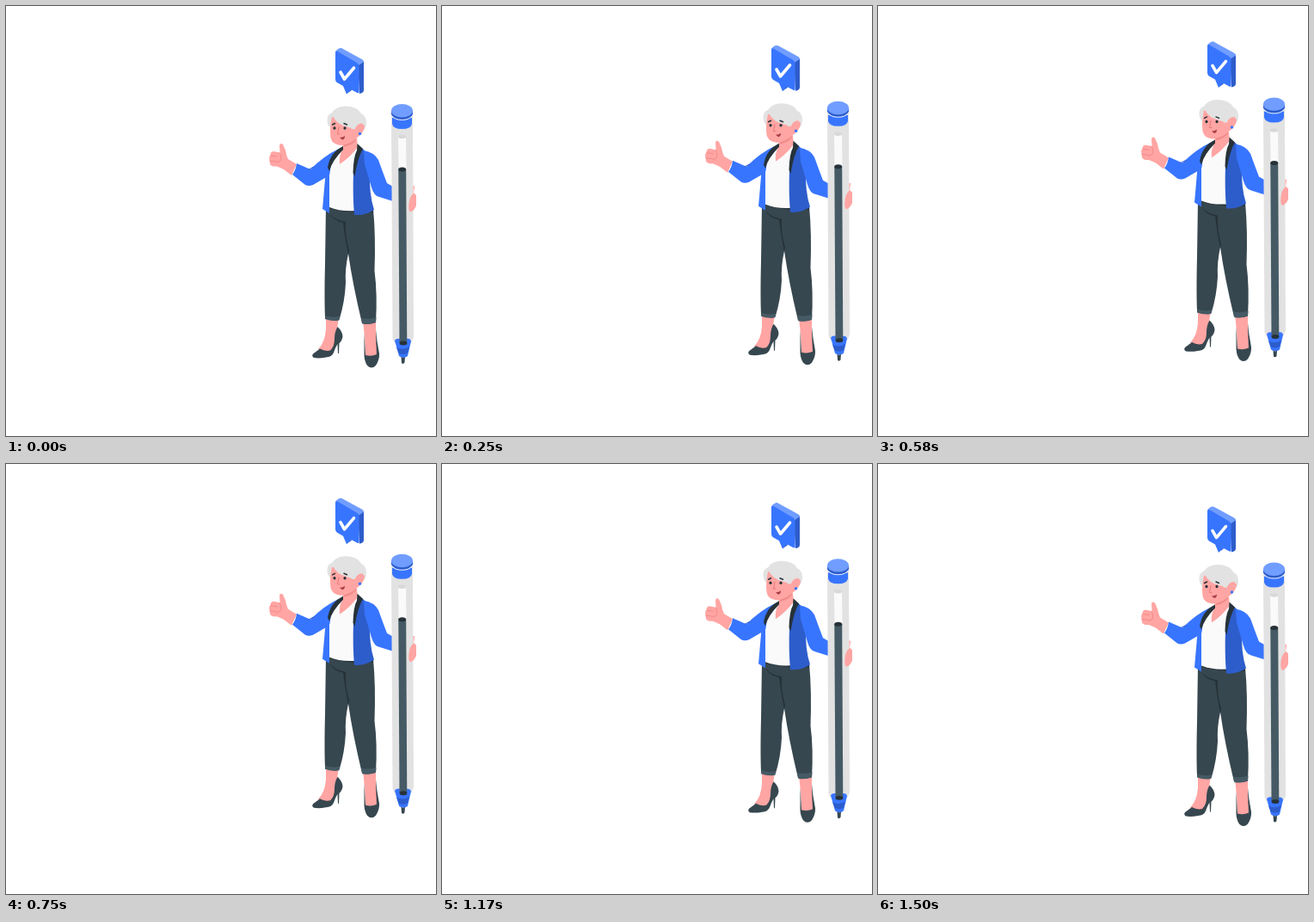
Animation, 500 px wide and 500 px high, one loop 1540 ms. Source, as an HTML page:

```html
<!DOCTYPE html>
<html lang="en">
<head>
<meta charset="utf-8">
<title>Thumbs up</title>
<style>
  html, body { margin: 0; width: 100%; height: 100%; overflow: hidden; background: #fff; }
  svg { display: block; width: 100%; height: 100%; }
  .blue { fill: #3875ff; }
  .deep { fill: #2d5dcb; }
  .pale { fill: #709dff; }
  .skin { fill: #ffa5a3; }
  .dark { fill: #37474f; }
  .ink { fill: #263238; }
  .slate { fill: #455a64; }
  .grey { fill: #e2e2e2; }
  .white { fill: #fafafa; }
  .line { fill: none; stroke-linecap: round; stroke-linejoin: round; }
</style>
</head>
<body>
<svg viewBox="0 0 500 500">
  <g id="scene">
    <g id="bubble">
      <path class="deep" d="M409 67L416 64V98Q416 100 414 101L411 102ZM396 102L402 98L400 95Z"/>
      <path class="pale" d="M383 53Q385 50 388 49Q390 48.500 392 50L414 62Q416 63 416 65L410 69Z"/>
      <path class="blue" d="M383 54Q383 51.500 386 53L408 66Q410.500 67.500 410.500 70V100Q410.500 102 408.500 101L401 97L396 102.500L392 93L385 89Q383 88 383 85Z"/>
      <path class="line" stroke="#fff" stroke-width="3.600" d="M389 77L393.500 85L404.500 72"/>
    </g>

    <g id="legs">
      <path class="skin" d="M372 362H387L385 375Q384 394 378 401Q370 404 363 399Q371 391 372 376Z"/>
      <path class="dark" d="M385.500 373Q391 378 391.500 384Q391 389 387.500 392L387 404H386L385.500 393Q383 397 381 403Q379 408 372 408.500Q364 410 358 409Q355 407 357 404.500L365 398.500Q371 402 377 400.500Q382 396 382 387Q382 379 385.500 373Z"/>
      <path class="skin" d="M415 366H430L430 380L432 407H418L417 385Z"/>
      <path class="dark" d="M430 376Q431 389 434 404Q434.500 411 430 418Q425 423 420 418Q416 412 416.500 402L416.500 380L418 406Q425 408 431 405Q430 390 430 376Z"/>
      <path class="dark" d="M372 233L371 300Q370 340 371 362Q378 367 387.500 365Q394 344 395 322Q394 306 398 288Q403 323 414 369Q423 371 430 368Q432 335 428.500 308Q430 268 427 236Z"/>
      <path class="ink" d="M375 233L405 238L427 236V240Q401 242 375 235Z"/>
      <path class="ink" d="M376 241Q381 250 392 252Q394 269 398 289L399 284Q394 266 395 251Q382 249 376 241Z"/>
      <path class="slate" d="M371 360Q379 363 388 361L387 365.500Q379 367 371 364ZM413 363Q422 365 430.500 362L430 368Q422 371 414.500 369.500Z"/>
    </g>

    <g id="torso">
      <path class="skin" d="M338 184L328 178Q326 174 325 168L322 161Q319 158.500 318 162L318.500 170.500L311 169Q307.500 169.500 307.500 173L306 176L307 184Q309 187 315 186.500L323 190L332 197Z"/>
      <path class="line" stroke="#ee8586" stroke-width=".8" d="M308 174L315 175M307 180L315 181M318 171Q321 174 319 180L315 182"/>
      <path class="blue" d="M387 166Q370 174 354 190L338 183Q337 191 333 196L348 208Q352 210 357 208L376 197Z"/>
      <path class="line" stroke="#2d5dcb" stroke-width="1" d="M352 190L358 187"/>
      <path class="white" d="M391 166L378 183Q374 210 376 234Q388 239 406 238L408 164Z"/>
      <path class="skin" d="M392 156L391 168Q387 174 388 184Q400 176 409 164L408 154Z"/>
      <path class="blue" d="M391 164Q377 172 372 190L368 236L376 241V190Q378 180 391 167Z"/>
      <path class="ink" d="M392 163Q377 170 374 188L376 192Q379 180 392 167Z"/>
      <path class="deep" d="M413 165Q423 170 423 190Q422 219 428 237Q418 244 405 243Q403 222 404 192Z"/>
      <path class="ink" d="M408.500 160L415 166Q409 176 405.500 198L403.500 194Q404 175 408 168Z"/>
      <path class="blue" d="M416 168Q428 170 433 179Q438 193 443 206L450 210V227L434 222Q428 221 425 211L417 184Z"/>
    </g>

    <g id="head">
      <path class="grey" d="M379 143Q374 140 373.500 134Q373 126 379 124Q384 116 396 116.500Q409 117 413 125Q419 128 419 136Q419 142 414 147Q411 153 406 152L390 145Z"/>
      <path class="skin" d="M379 129Q376 143 377.500 153Q379 161 389 162Q401 162 407 154Q416 148 417 140Q414 133 407 140L398 131Z"/>
      <path fill="#f08b8b" d="M393 161.500Q403 159 408 153Q406 161 392.500 164Z"/>
      <path class="grey" d="M379 128Q383 118 398 121Q411 124 412 135Q407 139 406 143Q402 144 400 141Q398 142 396 140Q385 138 380 128Z"/>
      <path class="line" stroke="#263238" stroke-width="1.500" d="M379.500 138L382.500 136.500M393 136.500L396.500 138"/>
      <ellipse class="ink" cx="382" cy="142" rx="1.600" ry="1.800"/>
      <ellipse class="ink" cx="394" cy="142" rx="1.600" ry="1.800"/>
      <path class="line" stroke="#e87978" stroke-width="1" d="M387 141L385.500 149H388"/>
      <path fill="#a83d48" d="M388 153Q392 153 394 151Q394 155 391 155.500Z"/>
      <circle class="blue" cx="411.500" cy="148.500" r="1.700"/>
    </g>

    <g id="pen">
      <path class="grey" d="M448 124H473L474 385Q473 390 469 394H455Q450 391 449.500 386Z"/>
      <path class="white" d="M456 152H465L465.500 190H456.500Z"/>
      <ellipse cx="460.500" cy="152" rx="4.500" ry="2.200" fill="#d8d8d8"/>
      <path class="blue" d="M452 389Q454 385 462 388Q470 385 471 390L467 407Q462 411 457 407Z"/>
      <path class="deep" d="M454 397Q462 401 469 396L466.500 404Q462 406 457 404Z"/>
      <path class="slate" d="M456.300 190H465.200L466.300 392H457.500Z"/>
      <ellipse class="ink" cx="460.700" cy="190" rx="4.500" ry="2.500"/>
      <ellipse class="ink" cx="462" cy="392" rx="4.400" ry="2.500"/>
      <path class="dark" d="M459.500 408Q462 410 464 408L463.500 414.500Q462 417 460 415Z"/>
      <path class="blue" d="M449 130H472V137Q471 143 460.500 143Q450 143 449 137Z"/>
      <path class="deep" d="M448 122H473V126Q470 132 460.500 132Q451 132 448 126Z"/>
      <path class="line" stroke="#eef3ff" stroke-width="1" d="M449 128.500Q453 132.500 460.500 132.500Q468 132.500 472 128.500"/>
      <ellipse class="pale" cx="460.500" cy="121.700" rx="12.500" ry="7.700"/>
      <path class="skin" d="M473.500 209L475.200 209.500L474 217L477 220V232Q475 238 470 239.500Q467.500 237 468.500 230Q469 222 473.500 218Z"/>
    </g>
  </g>
</svg>
<script>
  const LOOP = 1540, STEPS = 37, RISE = 10;
  const scene = document.getElementById('scene');

  // Linear float up and down, stepped at 24 pictures per second.
  function draw(now) {
    const step = Math.floor((now % LOOP) / LOOP * STEPS + 0.15) + 1;
    const phase = (step % STEPS) / STEPS;
    const lift = RISE * (1 - Math.abs(1 - 2 * phase));
    scene.setAttribute('transform', `translate(0 ${0.54 - lift})`);
    requestAnimationFrame(() => draw(performance.now()));
  }
  draw(performance.now());
</script>
</body>
</html>
```
